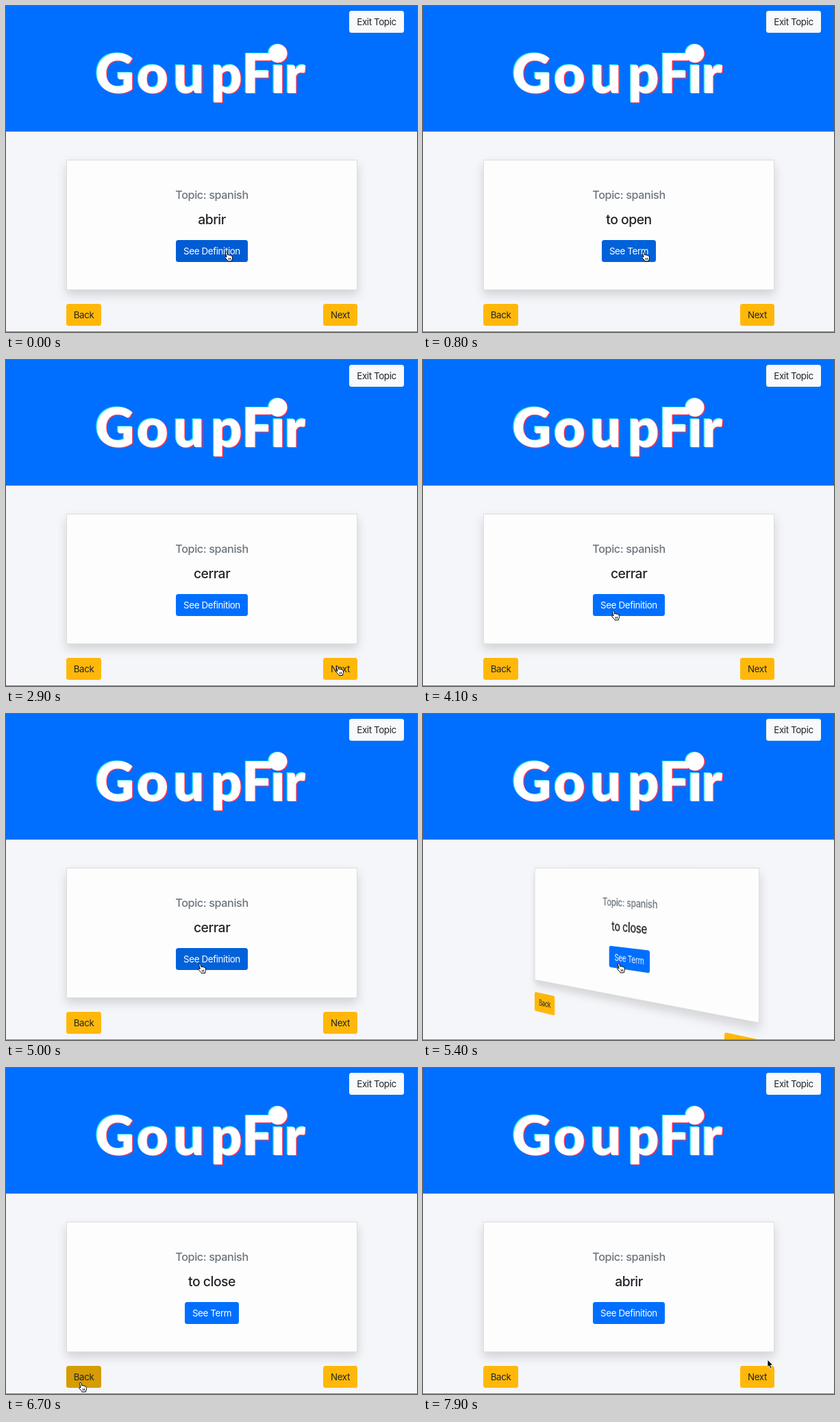
Animation, 600 px wide and 475 px high, one loop 8 s. Source, as an HTML page:

```html
<!DOCTYPE html>
<html lang="en">
<head>
<meta charset="utf-8">
<title>Flashcards</title>
<style>
  html, body { margin: 0; width: 100%; height: 100%; overflow: hidden; }
  #stage {
    position: relative; width: 600px; height: 475px; overflow: hidden;
    background: #f5f6f9; color: #212529;
    font: 400 13.4px Inter, "Liberation Sans", sans-serif; letter-spacing: -.4px;
  }
  #stage * { box-sizing: border-box; }
  header { position: absolute; width: 600px; height: 183px; background: #006fff; }
  svg { position: absolute; left: 0; top: 0; overflow: visible; }
  #mark { font: 900 79px Lato, "Open Sans", sans-serif; letter-spacing: 0; text-anchor: middle; }
  .btn {
    position: absolute; height: 32px; border-radius: 3.5px;
    display: flex; align-items: center; justify-content: center; white-space: nowrap;
  }
  #exit { left: 501px; top: 7px; width: 80px; background: #f8f9fa; }
  #scene {
    position: absolute; left: 88px; top: 224px; width: 425px; height: 243px;
    perspective: 865px; perspective-origin: 50% 0;
  }
  #face { position: absolute; inset: 0; transform-origin: 50% 0; }
  #card {
    position: absolute; width: 425px; height: 190px; background: #fefdfe;
    border: 1px solid rgba(0, 0, 0, .125); box-shadow: 0 7px 14px rgba(0, 0, 0, .15);
  }
  .line { position: absolute; width: 425px; text-align: center; line-height: 24px; font-weight: 500; }
  #topic { top: 39px; font-size: 16.2px; color: #6c757d; }
  #word { top: 75px; font-size: 19.4px; letter-spacing: -.5px; }
  #action { top: 117px; color: #fff; }
  #back { left: 0; top: 210px; width: 51px; }
  #next { left: 375px; top: 210px; width: 50px; }
  #edge { position: absolute; top: 474px; width: 600px; height: 1px; background: #85878b; }
</style>
</head>
<body>
<div id="stage">
  <header>
    <svg width="600" height="183">
      <defs>
        <g id="mark">
          <text y="127" x="159 214 267 322 367 397 422">GoupFir</text>
          <circle cx="397" cy="69" r="13.5"/>
        </g>
      </defs>
      <use href="#mark" x="-1.4" y="-.6" fill="#35e6f2"/>
      <use href="#mark" x="1.4" y=".8" fill="#ff3158"/>
      <use href="#mark" fill="#fff"/>
    </svg>
    <div class="btn" id="exit">Exit Topic</div>
  </header>
  <div id="scene">
    <div id="face">
      <div id="card"></div>
      <div class="line" id="topic">Topic: spanish</div>
      <div class="line" id="word"></div>
      <div class="btn" id="action"></div>
      <div class="btn" id="back">Back</div>
      <div class="btn" id="next">Next</div>
    </div>
  </div>
  <div id="edge"></div>
  <svg width="600" height="475">
    <g id="pointer" stroke-linejoin="round">
      <path id="hand" fill="#fff" stroke="#000" d="M-4.6-5.6C-4.2-7-2.4-6.8-2.1-5.5L-1.2-1.9C-.6-2.8.8-2.6 1.1-1.7 1.7-2.4 2.9-2.1 3.2-1.2 4.2-1.6 5-.9 5.2.2 5.6 2.2 5.4 3.8 4.6 5.2L4.7 6.7-.8 7.1-1.2 5.9C-2.6 4.9-3.6 3.4-5 1.9-5.9.7-4.6-.3-3.4.6L-2.9.9Z M.2 2.2L.6 5 M2.3 2L2.6 4.8"/>
      <path id="arrow" fill="#000" stroke="#fff" stroke-width=".8" d="M-4-6V5L-1.6 2.8.1 6.8 2 6 .3 2.1H3.7Z"/>
    </g>
  </svg>
</div>
<script>
const LOOP = 8000, FLIP = 300;
const $ = id => document.getElementById(id);
const deck = [["abrir", "to open"], ["cerrar", "to close"]];
const flips = [150, 1400, 5260, 6850];
const cardChanges = [2600, 6850];

// time, x, y
const path = [
  [0, 325, 365], [900, 325, 365], [1300, 327, 366], [1750, 327, 366],
  [2300, 487, 452], [3350, 487, 453], [4100, 281, 372], [4400, 281, 372],
  [5400, 289, 370], [5750, 289, 370], [6350, 112, 465], [7250, 112, 465],
  [7900, 507, 431]
];
const hovers = {
  action: [[0, 150], [600, 1400], [1700, 1900], [4200, 5260]],
  next: [[2350, 2750]],
  back: [[6400, 6850]]
};

const within = (t, spans) => spans.some(([a, b]) => t >= a && t < b);
const clamp = v => Math.min(1, Math.max(0, v));
const smooth = v => v * v * (3 - 2 * v);

// The CSS "ease" curve: cubic-bezier(.25, .1, .25, 1)
function ease(x) {
  if (x <= 0 || x >= 1) return clamp(x);
  const bezier = (s, a, b) => 3 * (1 - s) ** 2 * s * a + 3 * (1 - s) * s * s * b + s ** 3;
  let lo = 0, hi = 1;
  for (let i = 0; i < 24; i++) {
    const mid = (lo + hi) / 2;
    if (bezier(mid, .25, .25) < x) lo = mid; else hi = mid;
  }
  return bezier(lo, .1, 1);
}

function pointerAt(t) {
  const i = path.findIndex(p => p[0] > t);
  if (i < 0) return path[path.length - 1].slice(1);
  const [t0, x0, y0] = path[i - 1], [t1, x1, y1] = path[i];
  const k = smooth((t - t0) / (t1 - t0));
  return [x0 + (x1 - x0) * k, y0 + (y1 - y0) * k];
}

function render(t) {
  const turn = flips.reduce((sum, start, i) =>
    sum + (i % 2 ? -180 : 180) * ease((t - start) / FLIP), 0);
  const side = turn < 90 ? 0 : 1;
  const index = cardChanges.filter(c => t >= c).length % 2;
  $("face").style.transform = turn % 180 ? `rotateY(${turn - side * 180}deg)` : "none";
  $("word").textContent = deck[index][side];

  const width = side ? 79 : 105;
  const left = side ? 173 : 160;
  const action = $("action");
  action.textContent = side ? "See Term" : "See Definition";
  action.style.left = left + "px";
  action.style.width = width + "px";
  action.style.background = within(t, hovers.action) ? (t < 150 ? "#005cd3" : "#0062da") : "#006fff";
  for (const id of ["back", "next"])
    $(id).style.background = within(t, hovers[id]) ? "#d69c03" : "#ffb80a";

  const [x, y] = pointerAt(t);
  const tipX = x - 4 - 88, tipY = y - 6 - 224;
  const over = (l, top, w) => tipX >= l && tipX <= l + w && tipY >= top && tipY <= top + 32;
  const onButton = over(left, 117, width) || over(0, 210, 51) || over(375, 210, 50);
  $("pointer").setAttribute("transform", `translate(${x} ${y})`);
  $("hand").style.display = onButton ? "" : "none";
  $("arrow").style.display = onButton ? "none" : "";
}

const begin = performance.now();
function tick() {
  render((performance.now() - begin) % LOOP);
  requestAnimationFrame(tick);
}
tick();
</script>
</body>
</html>
```
